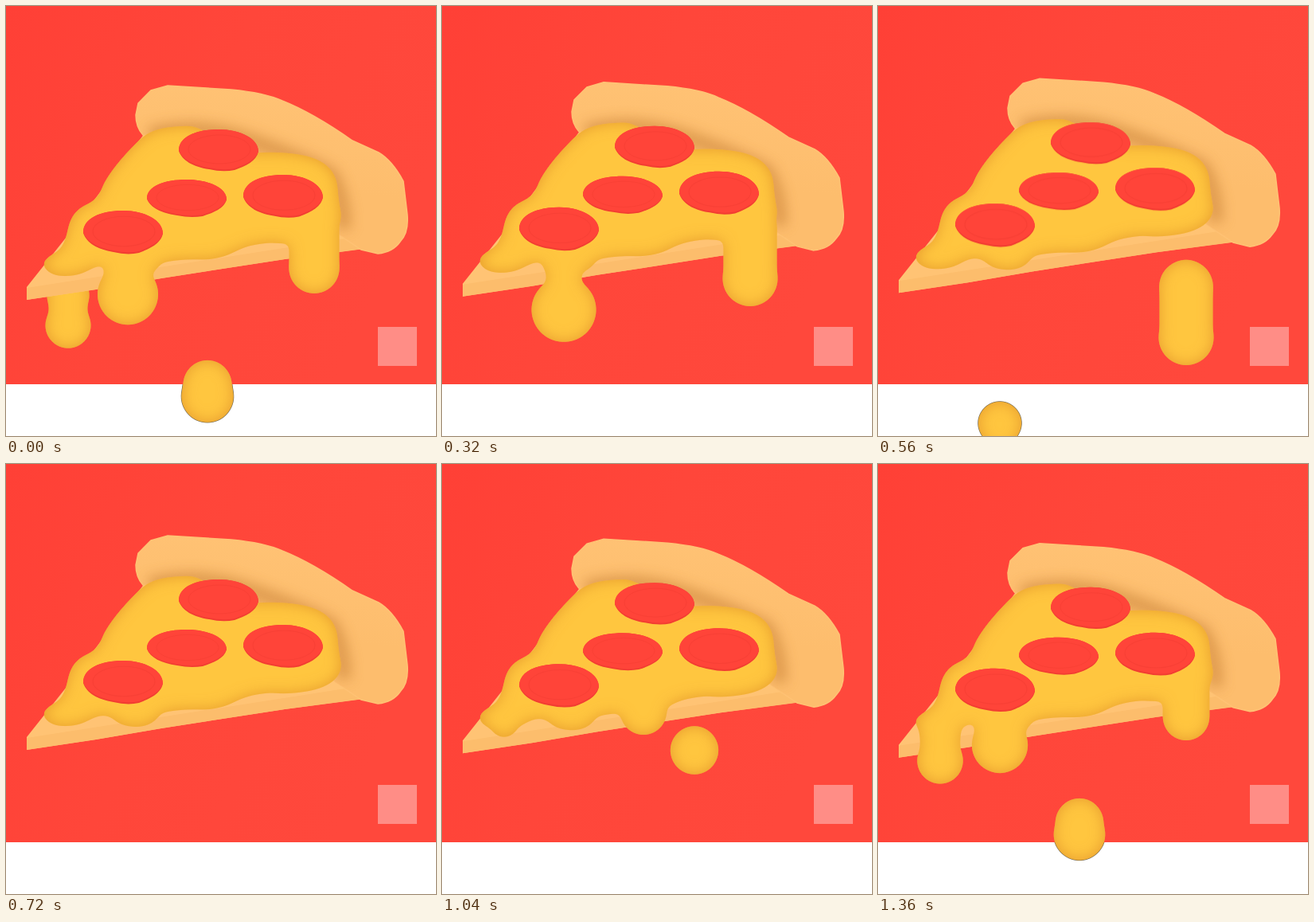
Write an HTML page that moves like this. It is 540x540 px and loops after 1.44 s.

```html
<!DOCTYPE html>
<html lang="en">
<head>
<meta charset="utf-8">
<title>Dripping pizza slice</title>
<style>
  html, body { margin: 0; height: 100%; overflow: hidden; background: #fff; }
  svg { display: block; width: 100vw; height: 100vh; }
  .cheese { fill: #ffc63f; filter: url(#goo); }
</style>
</head>
<body>
<svg viewBox="0 0 540 540">
  <defs>
    <linearGradient id="wall" x2="1" y2="0.4">
      <stop stop-color="#ff4036"/><stop offset=".5" stop-color="#ff463a"/><stop offset="1" stop-color="#ff483c"/>
    </linearGradient>
    <linearGradient id="dough" x1=".4" x2=".3" y2=".55">
      <stop stop-color="#ffc274"/><stop offset="1" stop-color="#fdbd6d"/>
    </linearGradient>
    <filter id="soft" filterUnits="userSpaceOnUse" x="0" y="0" width="540" height="540">
      <feGaussianBlur stdDeviation="8"/>
    </filter>
    <!-- Merges neighbouring blobs, darkens their rims, outlines them on the white strip -->
    <filter id="goo" filterUnits="userSpaceOnUse" x="0" y="0" width="540" height="640" color-interpolation-filters="sRGB">
      <feGaussianBlur stdDeviation="5" result="blur"/>
      <feColorMatrix in="blur" values="0 0 0 0 1  0 0 0 0 .777  0 0 0 0 .247  0 0 0 12 -5.3" result="body"/>
      <feColorMatrix in="blur" values="1 0 0 0 0  0 1 0 0 0  0 0 1 0 0  0 0 0 12 -4.6" result="wide"/>
      <feFlood flood-color="#4a3a1c" flood-opacity=".8" x="0" y="475" width="540" height="165"/>
      <feComposite in2="wide" operator="in" result="outline"/>
      <feGaussianBlur in="body" stdDeviation="9" result="inner"/>
      <feFlood flood-color="#e2932a" flood-opacity=".85"/>
      <feComposite in2="body" operator="in"/>
      <feComposite in2="inner" operator="out" result="rim"/>
      <feMerge>
        <feMergeNode in="outline"/><feMergeNode in="body"/><feMergeNode in="rim"/>
      </feMerge>
    </filter>
    <path id="crust" d="M163 137L166 122L182 106L203 100L283 105Q325 109 347 119Q385 134 435 169L468 184Q485 194 499 220L504 262Q506 285 495 296Q486 309 467 311L446 306L400 275L380 210L300 180L240 165L172 162Q163 152 163 137Z"/>
    <clipPath id="crustClip"><use href="#crust"/></clipPath>
    <g id="pepperoni">
      <path d="M0 27C0 9 22 0 50 0S100 12 100 28C97 40 84 46 70 51Q55 54 38 50C18 47 4 39 0 27Z" fill="#f23d32"/>
      <path d="M0 26C0 9 22 0 50 0S100 12 100 27C97 38 84 44 70 49Q55 52 38 48C18 45 4 37 0 26Z" fill="#ff4439"/>
      <ellipse cx="51" cy="25" rx="39" ry="18" fill="none" stroke="#f23d32" opacity=".5"/>
    </g>
  </defs>

  <rect width="540" height="475" fill="url(#wall)"/>
  <rect x="467" y="403" width="49" height="49" fill="#ff8d86"/>

  <g id="back" class="cheese"></g>
  <g class="bob">
    <path d="M174 160L124 226L76 290L26 353V369L113 356L195 342L350 318L470 302L430 200Z" fill="#ffc374"/>
    <path d="M26 354L445 289L465 303L350 318L195 342L113 356L26 369Z" fill="#fcbd6c"/>
    <use href="#crust" fill="url(#dough)" stroke="#ffc274" stroke-width="1.5"/>
    <g clip-path="url(#crustClip)">
      <path d="M180 162Q240 145 310 170T408 212Q424 240 424 280" fill="none" stroke="#c98238" stroke-width="18" opacity=".6" filter="url(#soft)"/>
    </g>
  </g>
  <g class="cheese">
    <path class="bob" d="M169 167C185 153 205 151 235 151L310 185Q345 182 375 188Q412 196 416 225Q417 245 421 262Q421 285 385 294Q355 300 332 297Q305 299 290 307Q268 320 240 318Q210 318 194 323Q186 339 165 340Q143 340 134 329Q122 321 105 331Q87 342 62 338Q44 331 47 321Q55 313 67 307Q75 298 78 280Q82 258 100 250Q117 244 122 225Q135 200 169 167Z"/>
    <g id="front"></g>
  </g>
  <g class="bob">
    <use href="#pepperoni" transform="translate(217 155)"/>
    <use href="#pepperoni" transform="translate(177 218) scale(1 .9)"/>
    <use href="#pepperoni" transform="translate(298 212) scale(1 1.03)"/>
    <use href="#pepperoni" transform="translate(97 257) scale(1 1.04)"/>
  </g>
</svg>
<script>
const LOOP = 1440, STEP = 80;
const SWELL = 140;       // time constant of a drop oozing out
const FALL_TIME = 480;   // how long a released drop lives
const front = document.getElementById("front");
const back = document.getElementById("back");
const bobbing = document.querySelectorAll(".bob");

// A drop swells from `rest` by `reach`, hangs for `hang` ms, then falls with `speed` and `pull`.
// `stretch` is its longest tail, `thin` how far its neck narrows.
const drops = [
  { x: 387, born: 1200, rest: 262, reach: 82, r: 35, hang: 720, speed: .75, pull: .002, stretch: 64, thin: .04 },
  { x: 153, born: 1200, rest: 308, reach: 66, r: 42, hang: 540, speed: .4, pull: .0016, stretch: 62, thin: .5 },
  { x: 78, born: 1020, rest: 320, reach: 37, r: 32, hang: 220, speed: .05, pull: .0009, stretch: 38, thin: .2, backAge: 400 },
  { x: 288, born: 620, rest: 262, reach: 16, r: 31, hang: 140, speed: 0, pull: .00105, stretch: 0, thin: 0, drift: .069 },
  { x: 253, born: 900, rest: 290, reach: 33, r: 36, hang: 140, speed: .56, pull: -.00035, stretch: 15, thin: .2 }
];

function dropMarkup(d, age) {
  const swell = 1 - Math.exp(-age / SWELL);
  const fall = Math.max(0, age - d.hang);
  const x = d.x + (d.drift || 0) * age;
  const low = d.rest + d.reach * swell + d.speed * fall + d.pull * fall ** 2;
  const high = Math.max(d.rest, low - d.stretch);
  const size = d.r * (.5 + .5 * swell);
  const lowR = size * (1 - .4 * d.thin * Math.min(1, fall / 180));
  const highR = size * (1 - .7 * d.thin);
  const neck = lowR * (1 - d.thin * swell ** 4);
  return `<circle cx="${x}" cy="${high}" r="${highR}"/><circle cx="${x}" cy="${low}" r="${lowR}"/>` +
    `<rect x="${x - neck}" y="${high}" width="${2 * neck}" height="${low - high}"/>`;
}

function draw(time) {
  const t = Math.floor(time % LOOP / STEP) * STEP;
  const lift = 5 * Math.cos(2 * Math.PI * t / LOOP) - 5;
  bobbing.forEach(el => el.setAttribute("transform", `translate(0 ${lift})`));

  let near = "", far = "";
  for (const d of drops) {
    const age = (t - d.born + LOOP) % LOOP;
    if (age > d.hang + FALL_TIME) continue;
    if (age >= d.backAge) far += dropMarkup(d, age);
    else near += dropMarkup(d, age);
  }
  front.innerHTML = near;
  back.innerHTML = far;
}

const start = performance.now();
function tick() {
  draw(performance.now() - start);
  requestAnimationFrame(tick);
}
tick();
</script>
</body>
</html>
```
